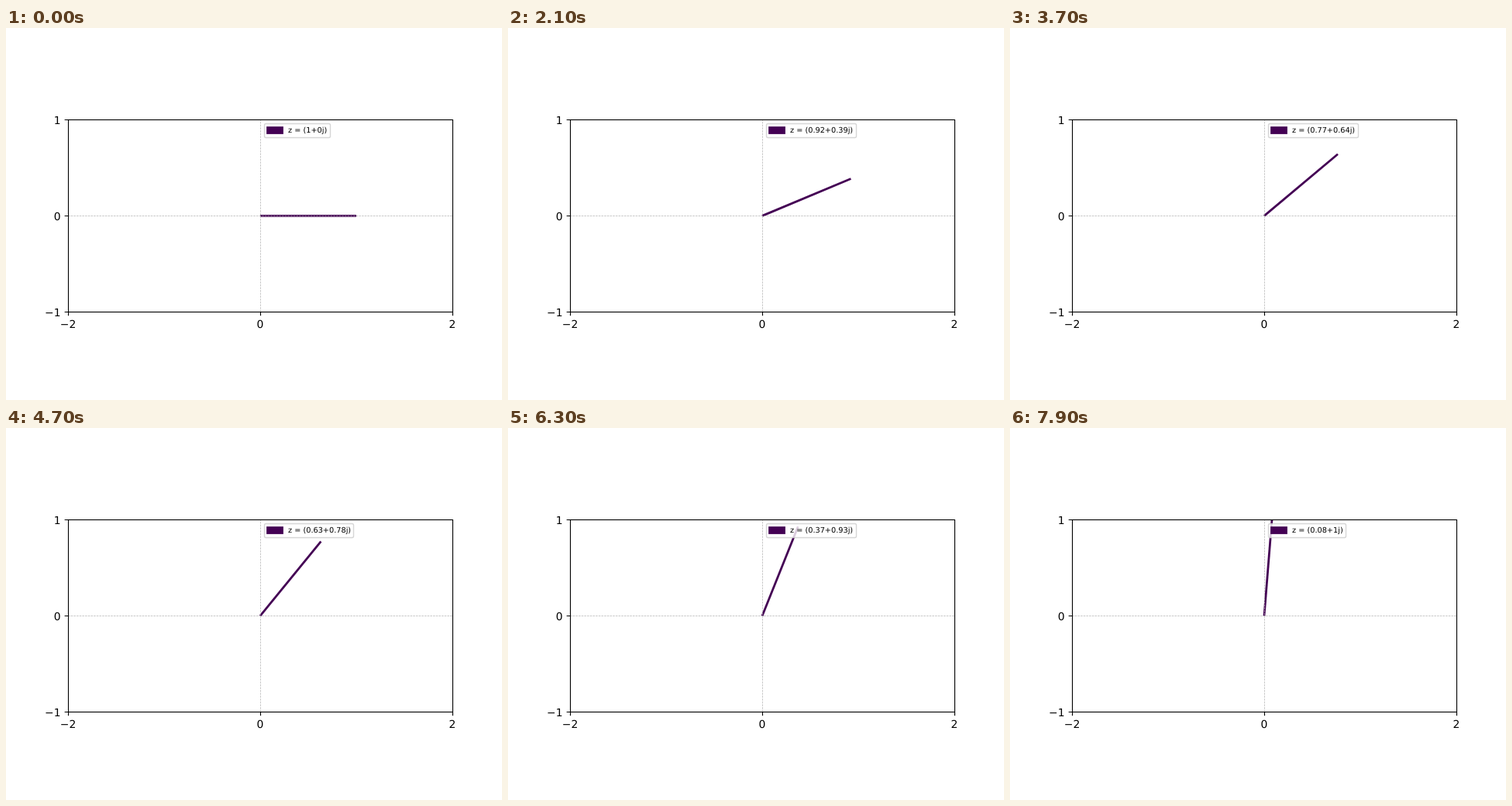
These frames come from a looping animation (640 by 480 pixels, 8 s). An HTML page:

```html
<!DOCTYPE html>
<html lang="en">
<head>
<meta charset="utf-8">
<title>Rotating complex number</title>
<style>
  html, body { margin: 0; width: 100%; height: 100%; overflow: hidden; background: #fff; }
  svg { display: block; width: 640px; height: 480px; }
  text { font-family: "DejaVu Sans", sans-serif; font-size: 13.89px; text-rendering: geometricPrecision; }
  #label { font-size: 9.72px; }
  .axis { fill: none; stroke: #000; stroke-width: 1.11; }
  .grid { fill: none; stroke: #b0b0b0; stroke-width: .694; stroke-dasharray: 2.57 1.11; }
</style>
</head>
<body>
<svg viewBox="0 0 640 480">
  <clipPath id="plot"><rect x="80" y="118.4" width="496" height="248"/></clipPath>
  <g clip-path="url(#plot)">
    <line id="vector" x1="328" y1="242.4" stroke="#440154" stroke-width="2.78"/>
  </g>
  <path class="grid" d="M328.5 366.4V118.4M80 242.5H576"/>
  <path class="axis" d="M80.5 366.5v4.86M328.5 366.5v4.86M576.5 366.5v4.86M80.5 118.5h-4.86M80.5 242.5h-4.86M80.5 366.5h-4.86"/>
  <rect class="axis" x="80.5" y="118.5" width="496" height="248"/>
  <g text-anchor="middle">
    <text x="80" y="387">−2</text>
    <text x="328" y="387">0</text>
    <text x="576" y="387">2</text>
  </g>
  <g text-anchor="end">
    <text x="70.5" y="124">1</text>
    <text x="70.5" y="248">0</text>
    <text x="70.5" y="372">−1</text>
  </g>
  <rect id="legend" x="333.5" y="123.5" height="18" rx="1.94" fill="#fff" fill-opacity=".8"
        stroke="#ccc" stroke-opacity=".8" stroke-width="1.39"/>
  <rect x="337.5" y="128.5" width="19" height="7" fill="#440154" stroke="#440154" stroke-width="2.78"/>
  <text id="label" x="364" y="135"></text>
</svg>
<script>
  const STEP_MS = 100, STEPS = 80, UNIT = 124;
  const TURN = 6 * Math.PI / 999;
  const FONT_SIZE = 9.72;
  const [vector, legend, label] = ["vector", "legend", "label"].map(id => document.getElementById(id));

  // Glyph advances in em; all digits share one width.
  const ADVANCE = { z: .525, " ": .318, ".": .318, "=": .838, "+": .838, "(": .39, ")": .39, j: .278 };
  const textWidth = text =>
    FONT_SIZE * [...text].reduce((sum, c) => sum + (ADVANCE[c] ?? (c === "8" ? .62 : .636)), 0);

  const round = value => Number(value.toFixed(2));

  function draw(ms) {
    const angle = Math.floor(ms / STEP_MS) % STEPS * TURN;
    const re = Math.cos(angle), im = Math.sin(angle);
    vector.setAttribute("x2", 328 + UNIT * re);
    vector.setAttribute("y2", 242.4 - UNIT * im);

    const text = `z = (${round(re)}+${round(im)}j)`;
    if (label.textContent === text) return;
    label.textContent = text;
    const right = Math.floor(367.9 + textWidth(text)) + .5;
    legend.setAttribute("width", right - 333.5);
  }

  const start = performance.now();
  function tick() {
    draw(performance.now() - start);
    requestAnimationFrame(tick);
  }
  tick();
</script>
</body>
</html>
```
